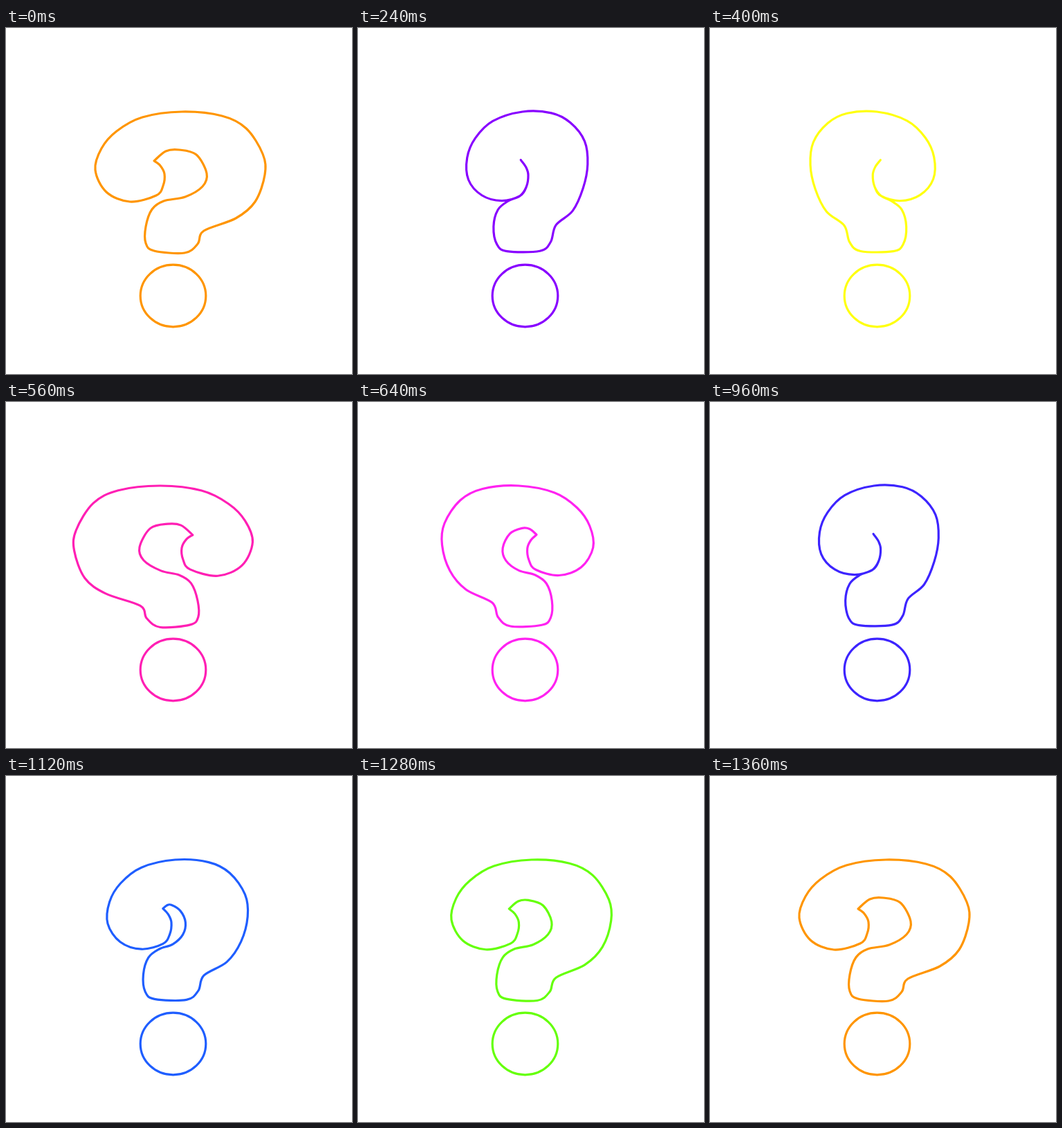
An HTML page with a canvas for the animation above (1.44 s loop, 500x500 px).

```html
<!DOCTYPE html>
<html lang="en">
<head>
<meta charset="utf-8">
<title>Turning question mark</title>
<style>
  html, body { margin: 0; width: 100%; height: 100%; overflow: hidden; background: #fff; }
  canvas { display: block; width: 100vw; height: 100vh; }
</style>
</head>
<body>
<canvas id="stage" width="500" height="500"></canvas>
<script>
const ctx = document.getElementById('stage').getContext('2d');
const STEP = 80;
const STEPS = 18;
const AXIS = 240;

// Turn: 1 faces the viewer, 0 is the narrowest view, negative is mirrored.
// Hues keep falling, so colours between the keys run through the rainbow.
const keys = [
  { step: 0, turn: 1, hue: 35, light: 50 },
  { step: 3, turn: 0.32, hue: -88, light: 50 },
  { step: 5, turn: -0.37, hue: -300, light: 53 },
  { step: 7, turn: -1.12, hue: -400, light: 56 },
  { step: 10, turn: -0.01, hue: -449, light: 58 },
  { step: 14, turn: 0.6, hue: -497, light: 56 },
  { step: 17, turn: 1, hue: -685, light: 50 }
];

// Outline from the inner tip round blob, top and foot to the stem:
// x, y seen from the front, then x, y in the narrow view.
const outline = [
  [214, 192, 246, 191], [223, 199, 252, 202], [229, 211, 254, 213],
  [227, 228, 251, 230], [217, 242, 242, 243], [179, 251, 221, 249],
  [145, 237, 195, 244], [129, 205, 174, 226], [138, 174, 167, 194],
  [160, 149, 174, 164], [197, 129, 194, 137], [254, 121, 230, 121],
  [312, 127, 264, 121], [347, 145, 288, 133], [371, 182, 307, 155],
  [374, 212, 312, 190], [360, 251, 309, 222], [332, 275, 300, 259],
  [286, 293, 286, 281], [277, 312, 279, 308], [258, 325, 265, 321],
  [214, 322, 216, 323], [202, 311, 200, 313], [202, 287, 193, 287],
  [211, 262, 198, 263], [228, 250, 212, 250]
];

// The inner edge runs back along the hook: hook point, and its offset when fully open.
const inner = [
  [4, 42, 2], [3, 57, 1], [2, 61, -1], [1, 52, -16], [0, 36, -16], [0, 17, -14]
];

const mix = (a, b, u) => a + (b - a) * u;
const clamp = v => Math.min(1, Math.max(0, v));

function stateAt(step) {
  const i = Math.max(1, keys.findIndex(k => k.step >= step));
  const a = keys[i - 1], b = keys[i];
  const u = (step - a.step) / (b.step - a.step);
  const between = name => mix(a[name], b[name], u);
  return { turn: between('turn'), hue: between('hue'), light: between('light') };
}

function hookPoints(turn) {
  const width = Math.abs(turn);
  const open = clamp((width - 0.4) / 0.6);
  const outer = outline.map(([fx, fy, nx, ny]) => [mix(nx, fx, width), mix(ny, fy, width)]);
  const back = inner.map(([i, dx, dy]) => [outer[i][0] + dx * open, outer[i][1] + dy * open]);
  const side = turn < 0 ? -1 : 1;
  return [...outer, ...back, outer[0]].map(([x, y]) => [AXIS + side * (x - AXIS), y]);
}

// Catmull-Rom curve whose two ends meet in a sharp corner.
function strokeCurve(points) {
  const at = i => points[Math.min(Math.max(i, 0), points.length - 1)];
  ctx.beginPath();
  ctx.moveTo(...at(0));
  for (let i = 0; i < points.length - 1; i++) {
    const [p, a, b, q] = [at(i - 1), at(i), at(i + 1), at(i + 2)];
    ctx.bezierCurveTo(
      a[0] + (b[0] - p[0]) / 6, a[1] + (b[1] - p[1]) / 6,
      b[0] - (q[0] - a[0]) / 6, b[1] - (q[1] - a[1]) / 6,
      b[0], b[1]);
  }
  ctx.closePath();
  ctx.stroke();
}

function draw(now) {
  const { turn, hue, light } = stateAt(Math.floor(now / STEP) % STEPS);
  ctx.fillStyle = '#fff';
  ctx.fillRect(0, 0, 500, 500);
  ctx.strokeStyle = `hsl(${(hue + 720) % 360}, 100%, ${light}%)`;
  ctx.lineWidth = 3.2;
  ctx.lineJoin = ctx.lineCap = 'round';
  strokeCurve(hookPoints(turn));
  ctx.beginPath();
  ctx.ellipse(241.5, 387, 47.3, 44.8, 0, 0, 2 * Math.PI);
  ctx.stroke();
  requestAnimationFrame(draw);
}
requestAnimationFrame(draw);
</script>
</body>
</html>
```
